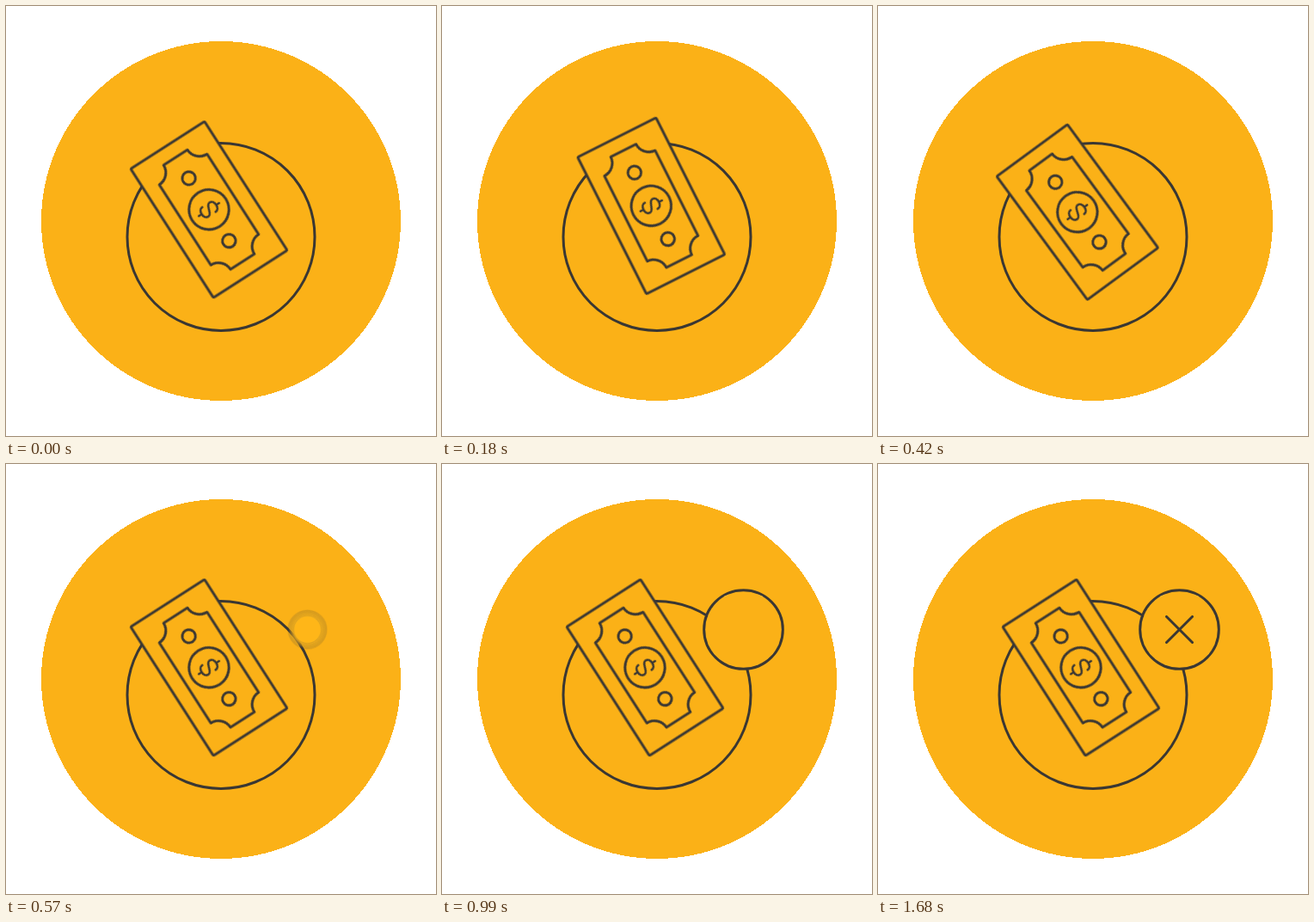
An HTML page with a canvas that plays this animation: 500 by 500 pixels, repeating every 3.63 s.

```html
<!DOCTYPE html>
<html lang="en">
<head>
<meta charset="utf-8">
<title>Payment declined</title>
<style>
  :root { --ink: #3a3733; --gold: #fbb117; --loop: 3630ms; }
  html, body { margin: 0; width: 100%; height: 100%; overflow: hidden; background: #fff; }
  svg, canvas { position: absolute; left: 0; top: 0; width: 500px; height: 500px; }
  .line { fill: none; stroke: var(--ink); stroke-width: 3; stroke-linecap: round; stroke-linejoin: round; }
  .solid { fill: var(--gold); }

  #bill { transform-origin: 281px 304px; animation: wobble var(--loop) infinite; }
  @keyframes wobble {
    0%       { transform: rotate(0deg);  animation-timing-function: steps(6, end); }
    4.9587%  { transform: rotate(6deg);  animation-timing-function: steps(6, end); }
    9.9174%  { transform: rotate(-6deg); animation-timing-function: steps(5, end); }
    14.0496%, 100% { transform: rotate(0deg); }
  }

  #cross path {
    stroke-dasharray: 1 2;
    animation: draw var(--loop) infinite, show var(--loop) step-end infinite;
  }
  @keyframes draw {
    0%, 31.405% { stroke-dashoffset: 1; animation-timing-function: steps(18, end); }
    46.281%, 100% { stroke-dashoffset: 0; }
  }
  @keyframes show {
    0% { opacity: 0; }
    32.231%, 100% { opacity: 1; }
  }
</style>
</head>
<body>
<svg viewBox="0 0 500 500">
  <circle class="solid" cx="250" cy="250" r="209" shape-rendering="crispEdges"/>
  <circle class="line" cx="250" cy="268.4" r="109"/>
  <g id="bill">
    <g class="line" transform="translate(236 236.7) rotate(-32.7)">
      <rect class="solid" x="-51" y="-89" width="102" height="178" rx="1.5"/>
      <path d="M-16.5-72H16.5A16.5 16.5 0 0 0 33-55.5V55.5A16.5 16.5 0 0 0 16.5 72H-16.5A16.5 16.5 0 0 0-33 55.5V-55.5A16.5 16.5 0 0 0-16.5-72Z"/>
      <circle r="23.2"/>
      <circle cy="-43.2" r="7.7"/>
      <circle cy="43.2" r="7.7"/>
      <path transform="rotate(90)" stroke-width="2.6" d="M6.5-5C6.5-8 4-10 0-10S-6.5-8-6.5-5S-3.5-1 0 0S6.5 2 6.5 5S4 10 0 10S-6.5 8-6.5 5M0-10V-14M0 10V14"/>
    </g>
  </g>
</svg>
<canvas id="badge" width="500" height="500"></canvas>
<svg id="cross" viewBox="0 0 500 500">
  <path class="line" pathLength="1" d="M335.5 177.5L365.5 207.5"/>
  <path class="line" pathLength="1" d="M365.5 177.5L335.5 207.5"/>
</svg>
<script>
  const LOOP = 3630, STEP = 30, POP = 540, GROW = 90, SETTLED = 1080;
  const RADIUS = 45.8, WIDTH = 3;
  const ctx = document.getElementById('badge').getContext('2d');
  const start = performance.now();
  let last = -1;

  // Linear growth, then a damped spring around full size.
  function scaleAt(ms) {
    const t = ms - POP;
    if (t <= 0) return 0;
    if (t < GROW) return t / GROW;
    if (ms >= SETTLED) return 1;
    const s = (t - GROW) / 1000;
    return 1 + 0.5 * Math.sin(17.6 * s) * Math.exp(-13.4 * s);
  }

  function disc(scale, alpha) {
    const r = RADIUS * scale, w = WIDTH * scale;
    ctx.globalAlpha = alpha;
    ctx.beginPath();
    ctx.arc(350.5, 192.5, r - w / 2, 0, 2 * Math.PI);
    ctx.fillStyle = '#fbb117';
    ctx.fill();
    ctx.beginPath();
    ctx.arc(350.5, 192.5, r, 0, 2 * Math.PI);
    ctx.lineWidth = w;
    ctx.strokeStyle = '#3a3733';
    ctx.stroke();
  }

  // Motion blur: average the disc over half a step.
  function drawBadge(ms) {
    ctx.clearRect(0, 0, 500, 500);
    if (ms < POP + STEP) return;
    ctx.globalCompositeOperation = 'lighter';
    const shutter = STEP / 2;
    const spread = Math.abs(scaleAt(ms + shutter) - scaleAt(ms)) * RADIUS;
    const n = spread < 0.3 ? 1 : 12;
    for (let i = 0; i < n; i++) {
      disc(scaleAt(ms + shutter * (i + 0.5) / n), 1 / n);
    }
  }

  function tick() {
    const ms = Math.floor((performance.now() - start) % LOOP / STEP) * STEP;
    if (ms !== last) drawBadge(last = ms);
    requestAnimationFrame(tick);
  }
  tick();
</script>
</body>
</html>
```
